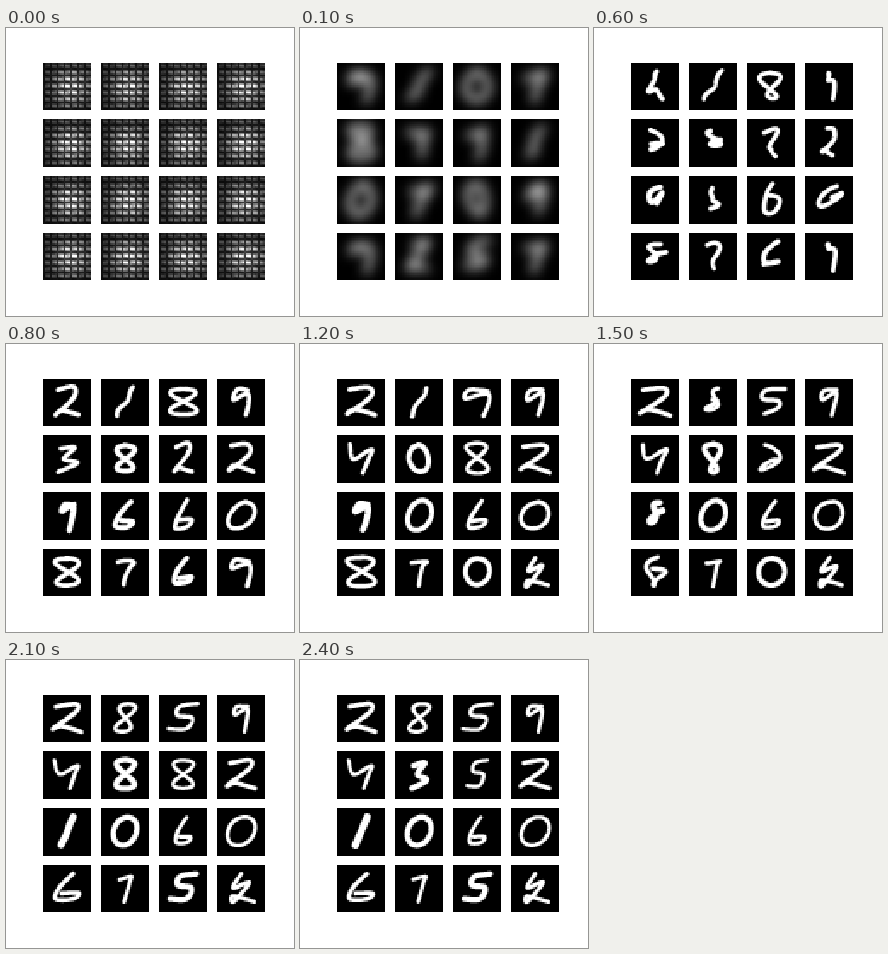
An HTML page with a canvas that plays this animation: 288x288 px, repeating every 2.5 s.

```html
<!DOCTYPE html>
<html>
<head>
<meta charset="utf-8">
<style>
html, body { margin: 0; width: 100%; height: 100%; overflow: hidden; background: #fff; }
canvas { display: block; }
</style>
</head>
<body>
<canvas id="stage" width="288" height="288"></canvas>
<script>
const stage = document.getElementById('stage').getContext('2d');
stage.imageSmoothingEnabled = false;
const small = document.createElement('canvas');
small.width = small.height = 28;
const pen = small.getContext('2d');

const { sin, cos, min, max, floor, round, abs, exp, PI } = Math;
const mix = (a, b, k) => a + (b - a) * k;
const keySteps = [3, 8, 12, 17, 21, 24];

// Catmull-Rom curve through a few points in a 10 by 10 box
function curve(text) {
  const n = text.split(' ').map(v => v / 10);
  const last = n.length / 2 - 1;
  return u => {
    const i = min(last - 1, floor(u * last)), f = u * last - i;
    return [0, 1].map(k => {
      const [a, b, c, d] = [-1, 0, 1, 2].map(o => n[2 * min(last, max(0, i + o)) + k]);
      return b + f / 2 * (c - a + f * (2 * a - 5 * b + 4 * c - d + f * (3 * (b - c) + d - a)));
    });
  };
}

const glyphs = {
  0: u => [0.5 - sin(2 * PI * u) / 2, 0.5 - cos(2 * PI * u) / 2],
  1: curve('8 0 5 5 2 10'),
  2: curve('1 1 8 0 8 3 0 9 3 8 10 10'),
  3: curve('2 2 8 1 4 5 9 7 1 10'),
  4: curve('5 0 2 5 8 3 2 10 2 8 10 10'),
  5: curve('10 0 4 1 3 4 8 5 6 9 0 9'),
  6: curve('7 0 2 5 1 9 7 9 9 7 3 7'),
  7: curve('0 2 9 1 8 3 5 10'),
  8: u => [0.5 - sin(4 * PI * u) / 2, 0.5 - cos(2 * PI * u) / 2],
  9: curve('9 1 2 1 1 4 9 2 7 10'),
  y: curve('0 0 2 5 9 2 8 5 6 10')
};

// Shapes at the key steps, final width, pen width, slant
const tile = (shapes, width, weight, slant = 0) => ({ shapes, width, weight, slant });
const tiles = [
  tile('922222', 28, 4),
  tile('111888', 16, 3.2, 6),
  tile('089555', 29, 3.2),
  tile('799999', 16, 3),
  tile('83yyyy', 25, 3),
  tile('780883', 18, 5),
  tile('728285', 20, 3),
  tile('122222', 28, 3.8),
  tile('099811', 13, 6.5, 4),
  tile('760000', 23, 4.8, 5),
  tile('066666', 18, 3),
  tile('900000', 27, 3.2, 7),
  tile('988666', 28, 3.6),
  tile('277777', 13, 3, 2),
  tile('560055', 26, 4.8),
  tile('794444', 26, 3.3)
];

function drawDigit(tile, seed, step) {
  let key = 0;
  while (key < 4 && step >= keySteps[key + 1]) key++;
  const k = max(0, (step - keySteps[key]) / (keySteps[key + 1] - keySteps[key]));
  const from = glyphs[tile.shapes[key]], to = glyphs[tile.shapes[key + 1]];
  const grown = step / 24, settled = min(1, step / 14);
  const width = mix(19, tile.width, settled);
  const wobble = 2 * (1 - grown);
  const blur = step < 3 ? 5.3 - 1.8 * step : max(0.3, 0.9 - (step - 3) * 0.12);

  pen.save();
  pen.filter = `blur(${blur}px)`;
  pen.scale(28 / 47.5, 28 / 47.5);
  pen.strokeStyle = '#fff';
  pen.lineCap = pen.lineJoin = 'round';
  pen.lineWidth = mix(4, tile.weight, grown) + 0.7;
  pen.beginPath();
  for (let u = 0; u <= 1; u += 1 / 64) {
    const [px, py] = from(u), [qx, qy] = to(u);
    const x = mix(px, qx, k), y = mix(py, qy, k);
    pen.lineTo(
      24 + (x - 0.5) * width + tile.slant * (0.5 - y) + wobble * sin(9 * u + seed + step / 3),
      23 + (y - 0.5) * 28 + wobble * cos(7 * u + seed * 2 + step / 4));
  }
  pen.stroke();
  pen.restore();
}

// Untrained output: a lattice that glows in the middle
function drawLattice(seed) {
  for (let y = 0; y < 28; y++) {
    for (let x = 0; x < 28; x++) {
      const glow = exp(-((x - 16) ** 2 + (y - 14) ** 2) / 110);
      const grid = x % 4 === 0 ? 0.25 : [0.6, 1, 0.6, 0.2][y % 4];
      const grain = abs(sin(x * 13 + y * 78 + seed * 4));
      const v = 255 * grid * (0.18 + 0.75 * glow) * (0.75 + grain / 2);
      pen.fillStyle = `rgb(${v},${v},${v})`;
      pen.fillRect(x, y, 1, 1);
    }
  }
}

function draw(step) {
  stage.fillStyle = '#fff';
  stage.fillRect(0, 0, 288, 288);
  tiles.forEach((tile, i) => {
    const y = 34.6 + 56.7 * floor(i / 4);
    const top = round(y), bottom = round(y + 47.5);
    pen.fillStyle = '#000';
    pen.fillRect(0, 0, 28, 28);
    if (step) drawDigit(tile, i, step);
    else drawLattice(i);
    stage.drawImage(small, 37 + 58 * (i % 4), top, 48, bottom - top);
  });
}

const start = performance.now();
let shown = -1;
function tick() {
  const step = floor((performance.now() - start) / 100) % 25;
  if (step !== shown) draw(shown = step);
  requestAnimationFrame(tick);
}
tick();
</script>
</body>
</html>
```
